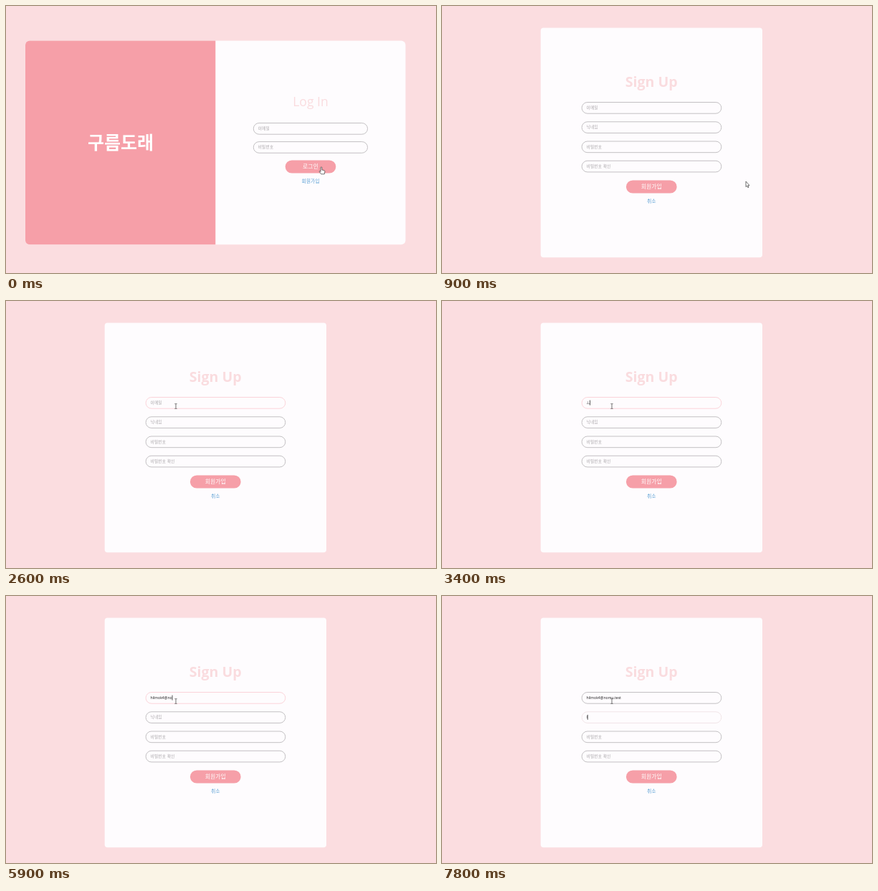
Animation, 600 px wide and 373 px high, one loop 8000 ms. Source, as an HTML page:

```html
<!DOCTYPE html>
<html lang="ko">
<head>
<meta charset="utf-8">
<title>Sign Up</title>
<style>
html, body { margin: 0; width: 100%; height: 100%; overflow: hidden; background: #fbdde0; }
svg { display: block; width: 600px; height: 373px; }
text { font-family: "Noto Sans CJK KR", "Noto Sans CJK", sans-serif; white-space: pre; }
.head { font-family: "Open Sans", "Noto Sans", sans-serif; fill: #fadcdf; text-anchor: middle; }
.brand { font-size: 25px; font-weight: 900; fill: #fff; text-anchor: middle; }
.hint { font-size: 5.6px; letter-spacing: .25px; fill: #a9a6a9; }
.typed { font: 5.15px "Open Sans", "Noto Sans", "Noto Sans CJK KR", sans-serif; fill: #1c1a1c; }
.btn { font-size: 7.9px; fill: #fff; text-anchor: middle; }
.link { font-size: 6.8px; fill: #5a9fd4; text-anchor: middle; }
.card { fill: #fefcfe; }
.pink { fill: #f69fa8; }
.field { fill: #fefcfe; stroke: #bdbabd; stroke-width: .9; }
.cursor { fill: #fff; stroke: #444; stroke-width: .75; stroke-linejoin: round; }
</style>
</head>
<body>
<svg viewBox="0 0 600 373">
  <rect width="600" height="373" fill="#fbdde0"/>
  <g id="login">
    <rect class="card" x="27" y="48.5" width="530.5" height="284.7" rx="6"/>
    <path class="pink" d="M292.3 48.5H33a6 6 0 0 0-6 6V327.2a6 6 0 0 0 6 6H292.3z"/>
    <text class="brand" x="160" y="200">구름도래</text>
    <text class="head" x="425" y="140" font-size="17.5">Log In</text>
  </g>
  <g id="signup">
    <rect class="card" x="137.7" y="30.5" width="309.3" height="320.7" rx="4"/>
    <text class="head" x="292.2" y="113" font-size="19.6" font-weight="700">Sign Up</text>
  </g>
  <rect id="caret" width=".7" height="7" fill="#111"/>
  <g id="cursor" class="cursor">
    <path id="arrow" d="M0 0V7.6L1.7 6.1 2.8 8.7 4 8.2 2.9 5.7H5z"/>
    <path id="hand" d="M-.9 .8a.9 .9 0 0 1 1.8 0V4l3 .7q1.2 .4 1 1.8l-.6 3.3h-4.6l-2.4-3.3q-.4-1 .6-1l1.2 .9z"/>
    <path id="beam" fill="none" d="M-1.6-3.4H-.4L0-3 .4-3.4H1.6M0-3V3M-1.6 3.4H-.4L0 3 .4 3.4H1.6"/>
  </g>
</svg>
<script>
const LOOP = 8000, STEP = 100;
const $ = id => document.getElementById(id);
const login = $('login'), signup = $('signup'), caret = $('caret'), cursor = $('cursor');
const hits = { login: [], signup: [] };

function add(parent, tag, attrs, text = '') {
  const el = document.createElementNS('http://www.w3.org/2000/svg', tag);
  for (const k in attrs) el.setAttribute(k, attrs[k]);
  el.textContent = text;
  return parent.appendChild(el);
}

function addField(page, x, y, width, label) {
  hits[page.id].push([x, y, width, 16, 'beam']);
  return {
    x: x + 6.4, y,
    box: add(page, 'rect', { class: 'field', x, y, width, height: 15.7, rx: 7.85 }),
    hint: add(page, 'text', { class: 'hint', x: x + 6.4, y: y + 9.7 }, label),
    typed: add(page, 'text', { class: 'typed', x: x + 6.4, y: y + 9.6 })
  };
}

function addActions(page, cx, y, label, link) {
  add(page, 'rect', { class: 'pink', x: cx - 35.3, y, width: 70.6, height: 18.2, rx: 9.1 });
  add(page, 'text', { class: 'btn', x: cx, y: y + 12 }, label);
  add(page, 'text', { class: 'link', x: cx, y: y + 31.8 }, link);
  hits[page.id].push([cx - 35, y, 70, 18, 'hand'], [cx - 13, y + 24.5, 26, 9, 'hand']);
}

addField(login, 345.3, 163.5, 159.2, '이메일');
addField(login, 345.3, 189.6, 159.2, '비밀번호');
addActions(login, 425, 215.4, '로그인', '회원가입');
const fields = ['이메일', '닉네임', '비밀번호', '비밀번호 확인']
  .map((label, i) => addField(signup, 195.1, 134.5 + i * 27.25, 194.7, label));
addActions(signup, 292.3, 243.4, '회원가입', '취소');

// time, x, y
const path = [
  [0, 440, 225], [100, 438, 227], [200, 432, 232], [300, 425, 239], [400, 424, 244], [500, 427, 245],
  [800, 427, 245], [900, 424, 245], [1000, 414, 236], [1200, 352, 196], [1400, 282, 156],
  [1600, 244, 144], [1700, 239, 142.5], [1800, 239, 143.5], [2100, 239, 143.5], [2300, 237, 147], [LOOP, 237, 147]
];

// time, focused field, its text, caret shown
const mail = 'hilmok4@nomu.test';
const typing = [
  [0, -1, '', 0], [2100, 0, '', 1], [2600, 0, '', 0], [3100, 0, '', 1],
  [3200, 0, 'ㅗ', 0], [3400, 0, 'ㅗ', 1], [3500, 0, 'ㅗ', 0],
  [3700, 0, 'ㅗㅑ', 0], [3800, 0, 'ㅗㅑ', 1], [4000, 0, 'ㅗㅑㅣ', 1],
  [4500, 0, 'ㅗㅑㅣ', 0], [5000, 0, 'ㅗㅑㅣ', 1], [5100, 0, '', 1],
  [5400, 0, mail.slice(0, 7), 1], [5600, 0, mail.slice(0, 8), 1],
  ...[9, 10, 11, 12, 13, 14, 15].map((n, i) => [5800 + i * 100, 0, mail.slice(0, n), 1]),
  [6600, 0, mail, 1], [6700, 1, '', 1], [7300, 1, '', 0], [7800, 1, 'l', 1]
];
const focusColor = ['#fbd0d5', '#f0e3e6'];

function pointAt(t) {
  const i = path.findIndex(p => p[0] > t);
  const [t0, x0, y0] = path[i - 1], [t1, x1, y1] = path[i];
  const k = (t - t0) / (t1 - t0);
  return [x0 + (x1 - x0) * k, y0 + (y1 - y0) * k];
}

function draw(t) {
  const page = t < 900 ? 'login' : 'signup';
  login.style.display = page === 'login' ? '' : 'none';
  signup.style.display = page === 'signup' ? '' : 'none';

  const [, focus, text, blink] = typing.filter(s => s[0] <= t).pop();
  fields.forEach((f, i) => {
    const value = i === focus ? text : i < focus ? mail : '';
    f.typed.textContent = value;
    f.hint.style.display = value ? 'none' : '';
    f.box.style.stroke = i === focus ? focusColor[i] : '';
  });
  caret.style.display = blink ? '' : 'none';
  if (blink) {
    const f = fields[focus];
    caret.setAttribute('x', f.x + (text ? f.typed.getComputedTextLength() : 0));
    caret.setAttribute('y', f.y + 4.1);
  }

  const [x, y] = pointAt(t);
  const hit = hits[page].find(([l, top, w, h]) => x >= l && x <= l + w && y >= top && y <= top + h);
  const kind = hit ? hit[4] : 'arrow';
  for (const id of ['arrow', 'hand', 'beam']) $(id).style.display = id === kind ? '' : 'none';
  cursor.setAttribute('transform', `translate(${x} ${y})`);
}

const start = performance.now();
function tick(now) {
  const t = Math.max(0, now - start) % LOOP;
  draw(Math.floor(t / STEP) * STEP);
  requestAnimationFrame(tick);
}
draw(0);
requestAnimationFrame(tick);
</script>
</body>
</html>
```
